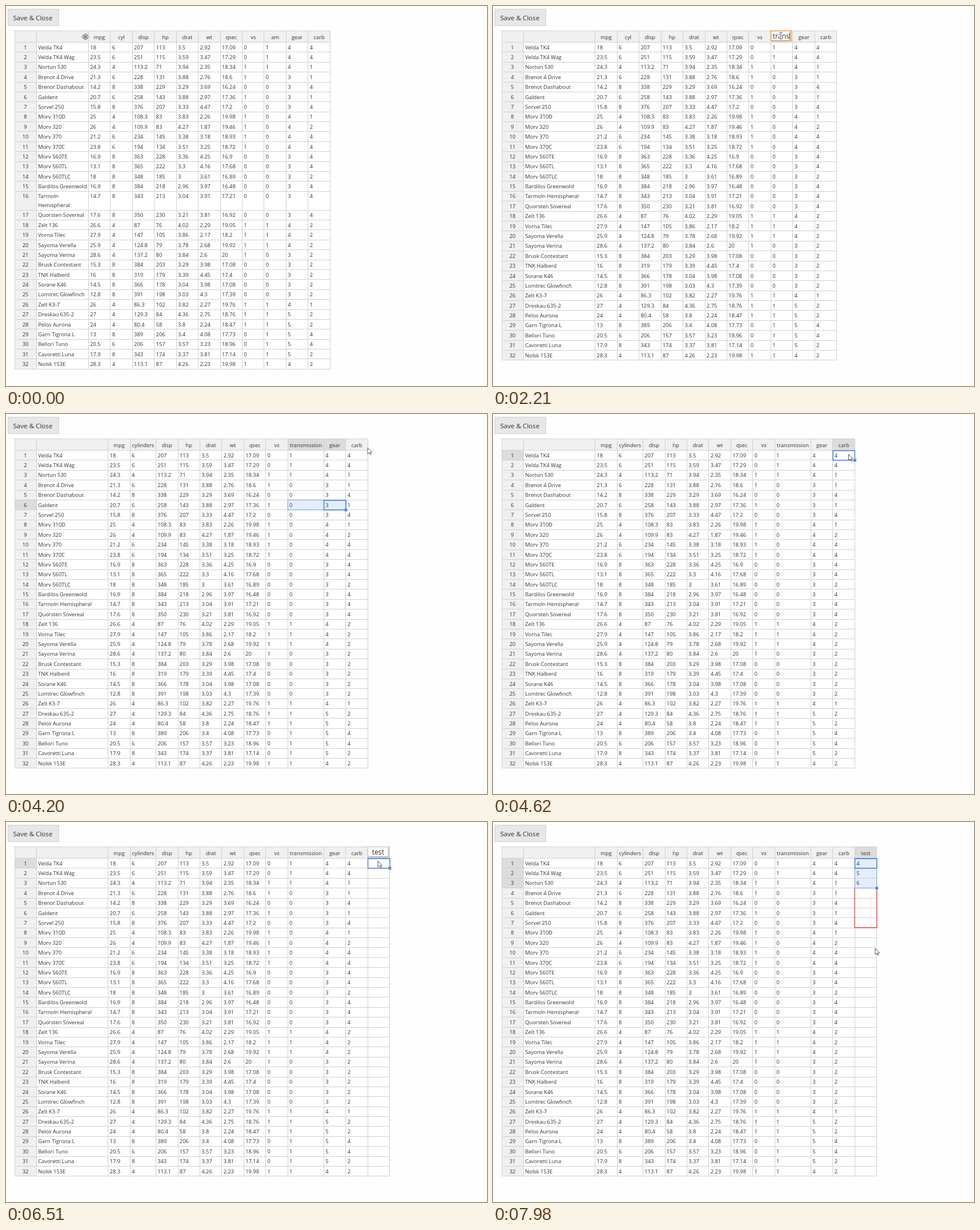
An HTML page with a canvas that plays this animation: 842 by 665 pixels, repeating every 8000 ms.

```html
<!DOCTYPE html>
<html lang="en">
<head>
<meta charset="utf-8">
<title>Editable table</title>
<style>
html, body { margin: 0; width: 100%; height: 100%; overflow: hidden; background: #fefefe; }
canvas { display: block; }
</style>
</head>
<body>
<canvas id="stage" width="842" height="665"></canvas>
<script>
const ctx = document.getElementById('stage').getContext('2d');
const LOOP = 8000, STEP = 105;
const LEFT = 15, TOP = 43.5, HEAD = 63.5, ROW = 17.387, COL = 38.45;
const BLUE = '#4b87e8', INK = '#333', GRID = '#d0d0d0';

// Models grouped in table order; the marks ', ; .' end a name with 4, 6 or 8 cylinders
const models = `Velda TK4;Velda TK4 Wag;Nortun 530,Brenot 4 Drive;Brenot Dashabout.Galdent;Sorvel 250.
Morv 310D,Morv 320,Morv 370;Morv 370C;Morv 560TE.Morv 560TL.Morv 560TLC.Bardilos Greenwold.
Tarmoln Hemispheral.Quorsten Sovereal.Zelt 136,Vorna Tilec,Sayoma Verella,Sayoma Verina,
Brusk Contestant.TNK Halberd.Sorane K46.Lomtrec Glowfinch.Zelt K3-7,Dreskau 635-2,Pelos Aurona,
Garn Tigrona L.Bellori Tuno;Cavoretti Luna.Nolsk 153E,`.match(/[^,;.\n]+[,;.]/g);

const noise = (r, c) => {
  const n = Math.sin(r * 12.9898 + c * 78.233) * 43758.5453;
  return n - Math.floor(n);
};

// Each measure follows the cylinder count, with some seeded scatter
function makeRow(model, r) {
  const name = model.slice(0, -1), cyl = 4 + 2 * ',;.'.indexOf(model.slice(-1));
  const measure = (c, base, slope, spread, digits) =>
    +(base + slope * cyl + (noise(r, c) - 0.5) * spread).toFixed(digits);
  const hp = measure(2, -45, 31, 60, 0);
  const am = +(r < 3 || (r > 16 && r < 20) || r > 24);
  const gear = am ? (r > 25 && r < 31 ? 5 : 4) : (r > 6 && r < 11 ? 4 : 3);
  const carb = cyl === 8 ? (hp > 205 ? 4 : 2) : cyl === 6 ? (gear > 3 ? 4 : 1) : 1 + Math.round(noise(r, 6));
  return [name, measure(0, 39, -3, 6, 1), cyl, measure(1, -140, 62, 80, cyl === 4 ? 1 : 0), hp,
    measure(3, 4.9, -0.21, 0.6, 2), measure(4, 0.6, 0.43, 0.9, 2), measure(5, 21.4, -0.57, 2, 2),
    +(cyl === 4 || (cyl === 6 && !am)), am, gear, carb];
}
const rows = models.map(makeRow);

// Moments of the story, in ms
const AT = {
  grab: 315, drop: 1310, editTrans: 1990, trans: 2620, editCyl: 3040, cyl: 3570, drag: 3770,
  cell: 4510, menu: 4720, insert: 5770, column: 5980, editTest: 6190, blur: 6400, test: 6600,
  digits: 6820, range: 7240, fill: 7760
};

// Cursor stops: arrival time, x, y, pause
const stops = [
  [0, 139, 54, 300], [1260, 178, 60, 100], [1680, 504, 52, 920], [2940, 240, 53, 630],
  [3780, 575, 159, 0], [4200, 633, 59, 0], [4720, 620, 73, 0], [5670, 672, 171, 100],
  [5985, 651, 53, 300], [6510, 651, 68, 650], [7400, 651, 107, 250], [7980, 669, 221, 0]
];

function cursorAt(t) {
  const next = stops.findIndex(stop => stop[0] > t);
  if (next < 0) return stops[stops.length - 1].slice(1, 3);
  const [t0, x0, y0, pause] = stops[next - 1], [t1, x1, y1] = stops[next];
  const u = Math.max(0, (t - t0 - pause) / (t1 - t0 - pause));
  return [x0 + (x1 - x0) * u, y0 + (y1 - y0) * u];
}

const between = (t, a, b) => t >= a && t < b;
const typed = (word, t, start, pace) => word.slice(0, Math.max(0, Math.floor((t - start) / pace) + 1));

function text(s, x, y, { size = 9.35, align = 'left', color = INK } = {}) {
  ctx.font = `${size}px "Open Sans", sans-serif`;
  ctx.textAlign = align;
  ctx.fillStyle = color;
  ctx.fillText(s, x, y + size * 0.37);
}

function rect(x, y, w, h, color) {
  ctx.fillStyle = color;
  ctx.fillRect(x, y, w, h);
}

const vLine = (x, y0, y1, color) => rect(Math.floor(x), y0, 1, y1 - y0, color);
const hLine = (y, x0, x1, color) => rect(x0, Math.floor(y), x1 - x0, 1, color);

function frame(x0, y0, x1, y1, color, width) {
  ctx.strokeStyle = color;
  ctx.lineWidth = width;
  ctx.strokeRect(x0, y0, x1 - x0, y1 - y0);
}

function selectionAt(t) {
  const cells = (c0, r0, c1 = c0, r1 = r0, active = [c0, r0]) => ({ c0, r0, c1, r1, active });
  const column = c => cells(c, 0, c, rows.length - 1);
  if (t >= AT.range) return cells(12, 0, 12, Math.min(2, 1 + Math.floor((t - AT.range) / 100)));
  if (t >= AT.digits) return cells(12, (1 + Math.floor((t - AT.digits) / STEP)) % 4);
  if (t >= AT.blur) return cells(12, 0);
  if (t >= AT.editTest) return null;
  if (t >= AT.column) return column(12);
  if (t >= AT.cell) return cells(11, 0);
  if (t >= AT.drag + STEP) return cells(9, 5, 10, 5, [10, 5]);
  if (t >= AT.drag) return cells(10, 5);
  if (between(t, AT.editCyl - STEP, AT.editCyl)) return column(2);
  if (between(t, AT.editTrans - 2 * STEP, AT.editTrans)) return column(9);
  return null;
}

function tableAt(t) {
  const labels = ['', 'mpg', t < AT.cyl ? 'cyl' : 'cylinders', 'disp', 'hp', 'drat', 'wt', 'qsec',
    'vs', t < AT.trans ? 'am' : 'transmission', 'gear', 'carb'];
  if (t >= AT.insert) labels.push(t < AT.test ? '' : 'test');
  const widths = labels.map(() => COL);
  widths[0] = t < AT.drop ? 91 : 125.4;
  if (t >= AT.cyl) widths[2] = 45.3;
  if (t >= AT.trans) widths[9] = 63.2;
  const xs = [53.4];
  widths.forEach(w => xs.push(xs[xs.length - 1] + w));
  const extra = t < AT.drop ? 15.5 : 0;
  const ys = Array.from({ length: 33 }, (_, i) => HEAD + i * ROW + (i > 15 ? extra : 0));
  return { labels, xs, ys };
}

function drawTable(t, { labels, xs, ys }, sel) {
  const right = xs[xs.length - 1], bottom = ys[32];
  rect(LEFT, TOP, right - LEFT, HEAD - TOP, '#f0f0f0');
  rect(LEFT, HEAD, xs[0] - LEFT, bottom - HEAD, '#f0f0f0');
  rect(xs[0], HEAD, right - xs[0], bottom - HEAD, '#fff');
  if (sel) {
    const { c0, r0, c1, r1 } = sel;
    rect(xs[c0], TOP, xs[c1 + 1] - xs[c0], HEAD - TOP, '#dcdcdc');
    rect(LEFT, ys[r0], xs[0] - LEFT, ys[r1 + 1] - ys[r0], '#dcdcdc');
    if (c0 !== c1 || r0 !== r1) rect(xs[c0], ys[r0], xs[c1 + 1] - xs[c0], ys[r1 + 1] - ys[r0], '#e4edfd');
  }
  [LEFT, ...xs].forEach(x => vLine(x, 43, bottom + 0.5, GRID));
  [TOP, ...ys].forEach(y => hLine(y, LEFT, right + 0.5, GRID));

  labels.forEach((label, c) => text(label, (xs[c] + xs[c + 1]) / 2, 54.5, { align: 'center' }));
  rows.forEach((row, r) => {
    const y = ys[r] + 8.7;
    text(r + 1, 34, y, { align: 'center' });
    row.forEach((value, c) => {
      const lines = c === 0 && r === 15 && t < AT.drop ? value.split(' ') : [value];
      lines.forEach((line, i) => text(line, xs[c] + 2.8, y + i * 16));
    });
  });
  [4, 5, 6].forEach((n, r) => {
    if (t >= AT.digits + r * STEP) text(n, xs[12] + 2.8, ys[r] + 8.7);
  });
}

function drawSelection({ xs, ys }, { c0, r0, c1, r1, active: [c, r] }) {
  const x1 = xs[c1 + 1], y1 = ys[r1 + 1];
  if (c0 !== c1 || r0 !== r1) frame(xs[c0], ys[r0], x1, y1, '#6f9ff2', 1);
  frame(xs[c] + 0.2, ys[r] + 0.7, xs[c + 1], ys[r + 1], BLUE, 1.6);
  rect(x1 - 3, y1 - 3, 6, 6, '#fff');
  rect(x1 - 2.5, y1 - 2.5, 5, 5, BLUE);
}

function drawFill(t, { xs, ys }) {
  if (t < AT.fill) return;
  const last = Math.min(6, 4 + Math.floor((t - AT.fill) / 100));
  const x0 = xs[12] - 0.3, x1 = xs[13] + 0.2, y0 = ys[3], y1 = ys[last + 1] - 0.4;
  ctx.strokeStyle = '#f52a2a';
  ctx.lineWidth = 1.2;
  ctx.beginPath();
  ctx.moveTo(x0, y0);
  ctx.lineTo(x0, y1);
  ctx.lineTo(x1, y1);
  ctx.lineTo(x1, y0 + 3);
  ctx.stroke();
}

function drawEditor(x, value, focused) {
  const width = 35.5, y0 = 43.5, y1 = 60.5, size = 12.2;
  ctx.save();
  ctx.shadowColor = 'rgba(0,0,0,.3)';
  ctx.shadowBlur = 3;
  ctx.shadowOffsetY = 1;
  rect(x, y0, width, y1 - y0, '#fff');
  ctx.restore();
  frame(x, y0, x + width, y1, focused ? '#e3a03a' : '#bbb', focused ? 1.5 : 1);
  ctx.save();
  ctx.beginPath();
  ctx.rect(x + 2, y0, width - 3, y1 - y0);
  ctx.clip();
  ctx.font = `${size}px "Open Sans", sans-serif`;
  const w = ctx.measureText(value).width;
  const start = w > width - 5 ? x + width - 3 - w : x + (width - w) / 2;
  text(value, start, 52, { size });
  if (focused) vLine(start + w + 0.5, 46, 59, INK);
  ctx.restore();
}

function drawEditors(t, { xs }) {
  const edit = (column, from, to, old, word, pace) => {
    if (!between(t, from, to)) return;
    const value = t < from + 100 ? old : typed(word, t, from + 100, pace);
    drawEditor(xs[column] + 0.2, value, t < AT.blur);
  };
  edit(9, AT.editTrans, AT.trans, 'am', 'transmission', 26);
  edit(2, AT.editCyl, AT.cyl, 'cyl', 'cylinders', 44);
  edit(12, AT.editTest, AT.test, '', 'test', 30);
}

function drawResizer(t) {
  if (!between(t, AT.grab, AT.drop)) return;
  const x = Math.max(144, cursorAt(t)[0] - 1);
  rect(x - 4, 44, 4, 19.5, '#34a9db');
  vLine(x, 44, 651, '#7ba3b3');
}

function drawMenu(t) {
  if (!between(t, AT.menu, AT.insert)) return;
  const x0 = 620.5, x1 = 788, y0 = 74.5, y1 = 255.5;
  ctx.save();
  ctx.shadowColor = 'rgba(0,0,0,.25)';
  ctx.shadowBlur = 3;
  ctx.shadowOffsetX = ctx.shadowOffsetY = 1;
  rect(x0, y0, x1 - x0, y1 - y0, '#fff');
  ctx.restore();
  const mouseY = cursorAt(t)[1];
  const items = ['Insert row above', 'Insert row below', 'Remove row', 'Insert column left',
    'Insert column right', 'Remove column', 'Undo', 'Redo', 'Alignment'];
  items.forEach((item, i) => {
    const y = 86 + i * 20.06;
    if (mouseY >= y - 10 && mouseY < y + 10) rect(x0, y - 10, x1 - x0, 20, '#f3f3ef');
    text(item, 633, y, { color: /do$/.test(item) ? '#aaa' : INK });
  });
  [136, 196, 236].forEach(y => hLine(y, x0, x1, '#dcdcdc'));
  frame(x0, y0, x1, y1, '#c4c4c4', 1);
  ctx.fillStyle = '#777';
  ctx.fill(new Path2D('M778 244 l5 2.5 l-5 2.5 z'));
}

const ARROW = 'M0 0 V11 L2.6 8.6 L4.4 12.3 L6 11.5 L4.3 8 H7.6 Z';
const HAND = 'M-1 0 Q0 -1.5 1 0 V4 L5 5 Q6.5 5.5 6 8 L5 12 H-1 L-4 7.5 Q-4 6 -2.5 6.5 L-1 8 Z';
const WIDE = 'M-7 0 l4 -4 v8 z M7 0 l-4 -4 v8 z M-3 0 H3 M-1 -6 V6 M1 -6 V6';
const MOVE = 'M-6 0 H6 M0 -6 V6 M-4 -2 l-2 2 l2 2 M4 -2 l2 2 l-2 2 M-2 -4 l2 -2 l2 2 M-2 4 l2 2 l2 -2';
const BEAM = 'M-2.5 -5.5 H2.5 M0 -5.5 V5.5 M-2.5 5.5 H2.5';

function drawCursor(t) {
  const editing = between(t, AT.editTrans, AT.trans) || between(t, AT.editCyl, AT.cyl)
    || between(t, AT.editTest, AT.blur);
  const shape = t < 840 ? WIDE : t < 1365 ? MOVE : editing ? BEAM
    : between(t, 5040, AT.insert + 100) ? HAND : ARROW;
  const path = new Path2D(shape);
  const outlined = shape === ARROW || shape === HAND;
  ctx.save();
  ctx.translate(...cursorAt(t));
  ctx.strokeStyle = ctx.fillStyle = '#fff';
  ctx.lineWidth = 3;
  if (outlined) ctx.fill(path);
  else ctx.stroke(path);
  ctx.strokeStyle = '#444';
  ctx.lineWidth = 0.9;
  ctx.stroke(path);
  ctx.restore();
}

function draw(time) {
  const t = Math.floor((time % LOOP) / STEP) * STEP;
  const table = tableAt(t), sel = selectionAt(t);
  rect(0, 0, 842, 665, '#fefefe');
  rect(3, 5, 90, 30, '#e7e7e7');
  frame(3.5, 5.5, 92.5, 34.5, '#d0d0d0', 1);
  text('Save & Close', 12.5, 20.3, { size: 11.6 });
  drawTable(t, table, sel);
  drawFill(t, table);
  if (sel) drawSelection(table, sel);
  drawEditors(t, table);
  drawResizer(t);
  drawMenu(t);
  drawCursor(t);
}

const begin = performance.now();
function tick() {
  draw(performance.now() - begin);
  requestAnimationFrame(tick);
}
tick();
</script>
</body>
</html>
```
